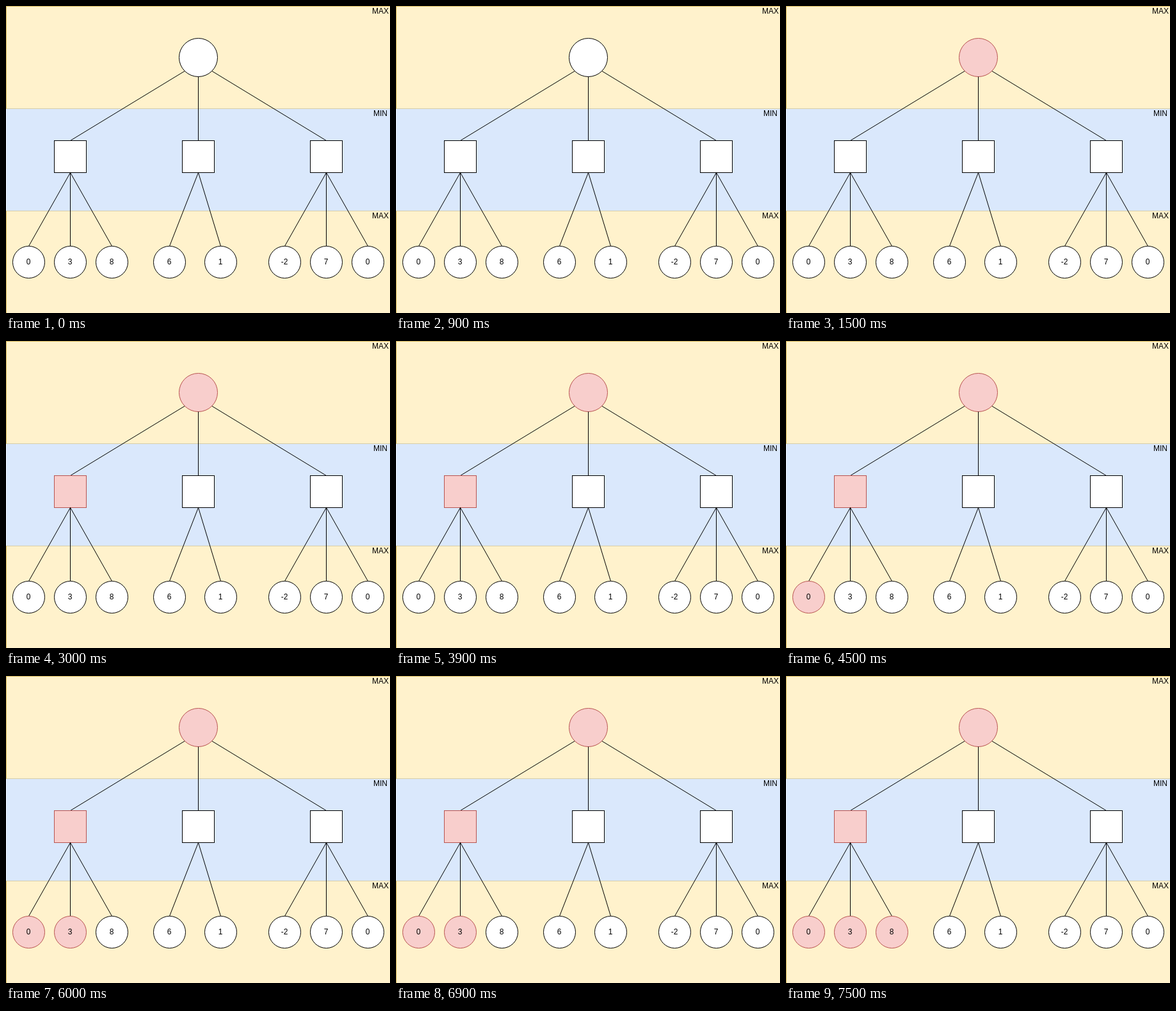
An HTML page that plays this animation: 600 by 480 pixels, repeating every 8000 ms.

```html
<!DOCTYPE html>
<html lang="en">
<head>
<meta charset="utf-8">
<title>Minimax tree traversal</title>
<style>
  html, body { margin: 0; width: 100%; height: 100%; overflow: hidden; }
  svg { display: block; width: 600px; height: 480px; background: #fff; }
  .max { fill: #fff2cc; stroke: #d6b656; }
  .min { fill: #dae8fc; }
  .edge { stroke: #000; }
  .node { fill: #fff; stroke: #000; }
  .node.visited { fill: #f8cecc; stroke: #b85450; }
  text { font: 12px "Liberation Sans", Arial, sans-serif; text-anchor: middle; fill: #000; }
</style>
</head>
<body>
<svg id="stage" viewBox="0 0 600 480"></svg>
<script>
const LOOP = 8000, STEP = 1500;
const stage = document.getElementById("stage");
const root = { x: 300, y: 80, r: 30 };
const branches = [
  { x: 100, leaves: [[35, 0], [100, 3], [165, 8]] },
  { x: 300, leaves: [[255, 6], [335, 1]] },
  { x: 500, leaves: [[435, -2], [500, 7], [565, 0]] }
];

function add(parent, tag, attrs, content = "") {
  const el = document.createElementNS("http://www.w3.org/2000/svg", tag);
  for (const name in attrs) el.setAttribute(name, attrs[name]);
  el.textContent = content;
  return parent.appendChild(el);
}

// Shapes sit on half pixels so one-pixel strokes stay crisp.
const shapes = add(stage, "g", { transform: "translate(.5 .5)" });
const band = (y, kind) => add(shapes, "rect", { x: 0, y, width: 600, height: 160, class: kind });
const edge = (x1, y1, x2, y2) => add(shapes, "line", { x1, y1, x2, y2, class: "edge" });
const circle = (cx, cy, r) => add(shapes, "circle", { cx, cy, r, class: "node" });
const label = (x, y, value) => add(stage, "text", { x, y }, value);

band(0, "max");
band(320, "max");
band(160, "min");
["MAX", "MIN", "MAX"].forEach((name, i) => label(585, 12 + 160 * i, name));

// Nodes are collected depth first, which is the order of the visit.
const nodes = [circle(root.x, root.y, root.r)];
for (const { x, leaves } of branches) {
  const angle = Math.PI / 2 - Math.sign(x - root.x) * Math.PI / 4;
  edge(root.x + root.r * Math.cos(angle), root.y + root.r * Math.sin(angle), x, 210);
  nodes.push(add(shapes, "rect", { x: x - 25, y: 210, width: 50, height: 50, class: "node" }));
  for (const [leafX, value] of leaves) {
    edge(x, 260, leafX, 375);
    nodes.push(circle(leafX, 400, 25));
    label(leafX, 404, value);
  }
}

function render(now) {
  const visited = Math.floor(now % LOOP / STEP);
  nodes.forEach((node, i) => node.classList.toggle("visited", i < visited));
}

const start = performance.now();
function tick() {
  render(performance.now() - start);
  requestAnimationFrame(tick);
}
tick();
</script>
</body>
</html>
```
